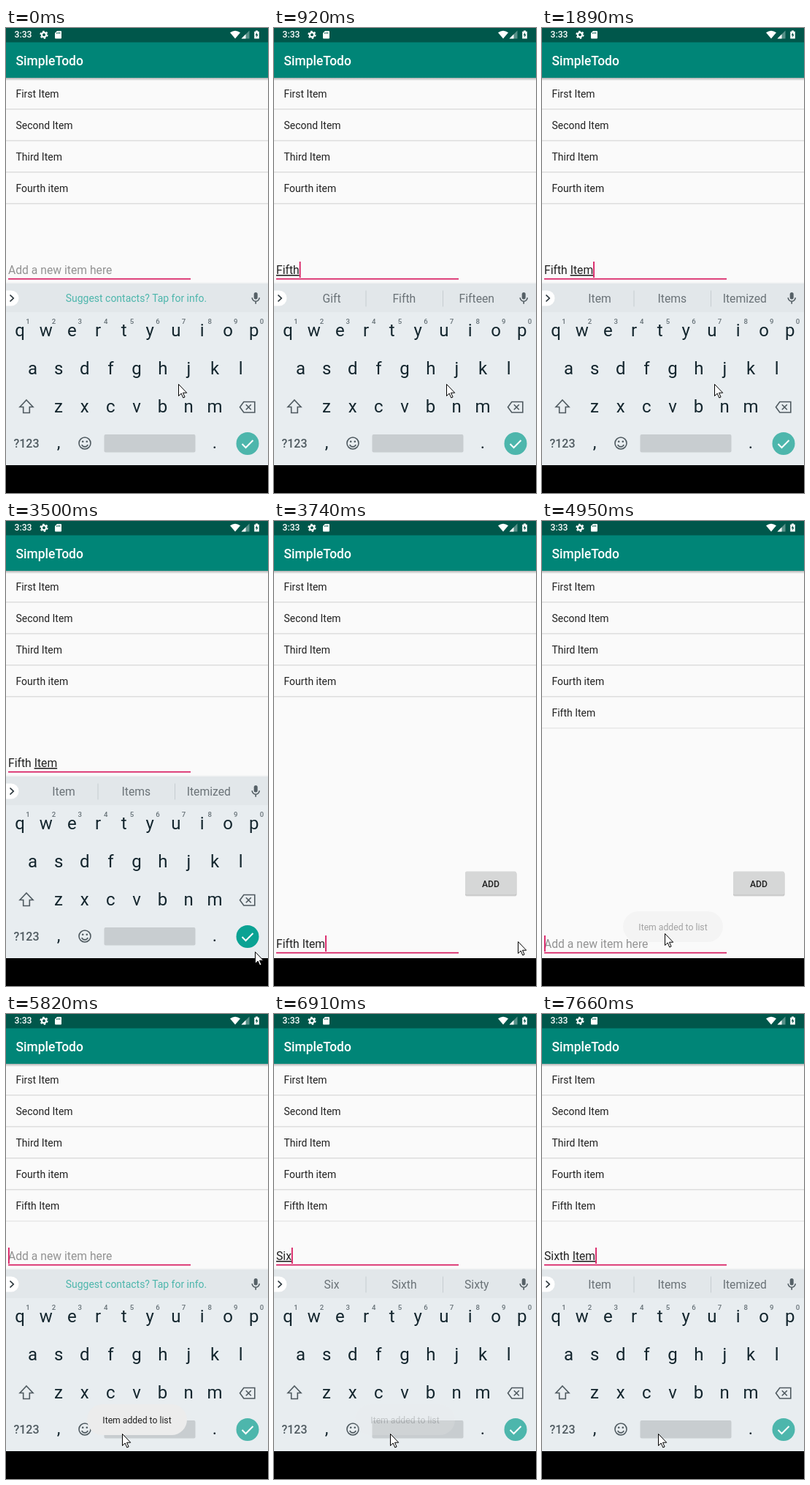
These frames come from a looping animation (359x635 px, 8000 ms). An HTML page:

```html
<!DOCTYPE html>
<html lang="en">
<head>
<meta charset="utf-8">
<title>Todo list demo</title>
<style>
  html, body { margin: 0; width: 359px; height: 635px; overflow: hidden; background: #fafafa; }
  svg { display: block; }
  text { font-family: Roboto, "Liberation Sans", sans-serif; white-space: pre; }
  .mid { text-anchor: middle; }
  .bold { font-weight: 500; }
  .row { font-size: 13.97px; fill: #212121; }
  .edit { font-size: 15.71px; }
  #word { text-decoration: underline; text-decoration-thickness: 1px; text-underline-offset: 1.5px; }
  .key { font-size: 24px; fill: #14262e; text-anchor: middle; }
  .digit { font-size: 9.6px; font-weight: 500; fill: #667177; text-anchor: middle; }
  .hintword { font-size: 15.71px; fill: #6a7277; text-anchor: middle; }
  .line { fill: none; stroke: #4f5a60; stroke-width: 1.6; }
</style>
</head>
<body>
<svg width="359" height="635" viewBox="0 0 359 635">
  <defs>
    <linearGradient id="shade" x2="0" y2="1">
      <stop stop-color="#000" stop-opacity=".3"/>
      <stop offset="1" stop-color="#000" stop-opacity="0"/>
    </linearGradient>
  </defs>
  <rect width="359" height="635" fill="#fafafa"/>
  <g id="list"></g>
  <rect y="68" width="359" height="4" fill="url(#shade)"/>
  <rect y="19" width="359" height="49" fill="#008577"/>
  <rect width="359" height="19.5" fill="#00574b"/>
  <text x="13.5" y="51" font-size="17.46" class="bold" fill="#fff">SimpleTodo</text>

  <g fill="#fff">
    <text x="11.5" y="13.4" font-size="12.2" class="bold">3:33</text>
    <circle cx="52" cy="9.3" r="3.1" fill="none" stroke="#fff" stroke-width="2.2"/>
    <circle cx="52" cy="9.3" r="4.8" fill="none" stroke="#fff" stroke-width="1.7" stroke-dasharray="2.5 2.53"/>
    <path d="M70 4h5q1 0 1 1v8.500q0 1-1 1h-7q-1 0-1-1v-6.500z"/>
    <path d="M69.700 6v2M71.700 5.500v2.500M73.700 5.500v2.500" stroke="#00574b" stroke-width=".9"/>
    <path d="M307 6.300q7-5 14 0l-7 8.200z"/>
    <path d="M333.500 3.500v11h-11z" opacity=".35"/>
    <path d="M328.500 8.500v6h-6z"/>
    <path d="M342 3.500h3v1.200h1.800v9.800h-6.600v-9.800h1.800z"/>
    <path d="M344 6l-2.300 4h1.500v3l2.300-4.200h-1.500z" fill="#00574b"/>
  </g>

  <g id="button">
    <rect x="262" y="480" width="70.500" height="32.500" rx="2" fill="#000" opacity=".13"/>
    <rect x="262" y="479.500" width="70.500" height="32" rx="2" fill="#000" opacity=".12"/>
    <rect id="face" x="262" y="478.500" width="70" height="32" rx="2"/>
    <text x="297" y="499.500" font-size="12.2" class="bold mid" fill="#212121">ADD</text>
  </g>

  <g id="field">
    <rect x="3" y="341.800" width="250" height="1.700" fill="#d81b60"/>
    <text id="hint" class="edit" x="3" y="336" fill="#929292">Add a new item here</text>
    <text id="typed" class="edit" x="3" y="336" fill="#212121"><tspan id="done"></tspan><tspan id="word"></tspan></text>
    <rect id="caret" y="319" width="1.800" height="22" fill="#d81b60"/>
  </g>

  <g id="keyboard">
    <rect y="347.500" width="359" height="2" fill="#eff1f2"/>
    <rect y="349" width="359" height="248" fill="#e8edf0"/>
    <rect y="349" width="359" height="39" fill="#e2e7ea"/>
    <path d="M0 358.500h7a10.500 10.500 0 0 1 0 21h-7z" fill="#fff"/>
    <path d="M5.500 364.500l4.700 4.500-4.700 4.500" fill="none" stroke="#263238" stroke-width="1.700"/>
    <rect x="339.700" y="361" width="5" height="9.500" rx="2.500" fill="#566167"/>
    <path d="M337.200 368.200a5 5 0 0 0 10 0M342.200 373.200v3.500" class="line"/>
    <text id="tip" x="178.500" y="374.200" font-size="13.97" class="mid" fill="#4db6ac">Suggest contacts? Tap for info.</text>
    <g id="words">
      <path d="M126 358.500v22M231.500 358.500v22" stroke="#c6ccd0"/>
      <text class="hintword" x="79" y="375"></text>
      <text class="hintword" x="178.300" y="375"></text>
      <text class="hintword" x="277.800" y="375"></text>
    </g>
    <g id="keys"></g>
    <path d="M28 508l9 9.500h-4.700v8h-8.600v-8h-4.700z" class="line"/>
    <path d="M325.800 510.500h15v14.500h-15l-5.300-7.250zM328.800 514.300l7 7M335.800 514.300l-7 7" class="line"/>
    <text x="28" y="572.800" font-size="16" class="bold mid" fill="#4f5a60">?123</text>
    <circle cx="108" cy="567" r="8" class="line"/>
    <circle cx="105.200" cy="564.700" r="1.300" fill="#4f5a60"/>
    <circle cx="110.800" cy="564.700" r="1.300" fill="#4f5a60"/>
    <path d="M103.800 569a4.500 4.500 0 0 0 8.400 0" class="line"/>
    <rect x="134.500" y="555" width="125" height="24.500" rx="2" fill="#c8cdd0"/>
    <circle id="enter" cx="331" cy="567.500" r="15.500"/>
    <path d="M323.500 568l5 5 10-10" fill="none" stroke="#fff" stroke-width="2"/>
  </g>

  <rect y="597" width="359" height="38"/>
  <g id="toast">
    <rect x="111" y="533" width="137" height="42" rx="21" fill="#ececec"/>
    <text x="179.500" y="558.500" font-size="12.2" class="mid" fill="#222">Item added to list</text>
  </g>
  <path id="mouse" d="M.5 .5v16l3.700-3.500 2.600 6 2.300-1-2.600-5.800h5.200z" fill="#fff" stroke="#000"/>
</svg>

<script>
const LOOP = 8000;
const $ = id => document.getElementById(id);

function add(parent, tag, attrs, text = "") {
  const el = document.createElementNS("http://www.w3.org/2000/svg", tag);
  for (const name in attrs) el.setAttribute(name, attrs[name]);
  el.textContent = text;
  return parent.appendChild(el);
}

const rows = ["First Item", "Second Item", "Third Item", "Fourth item", "Fifth Item"].map((label, i) => {
  const row = add($("list"), "g", { transform: `translate(0 ${68 + 43 * i})` });
  add(row, "text", { class: "row", x: 13.5, y: 27 }, label);
  add(row, "rect", { y: 42, width: 359, height: 1.6, fill: i < 4 ? "#dfdfdf" : "#e9e9e9" });
  return row;
});

[["qwertyuiop", 19, 421], ["asdfghjkl", 36.5, 472.5], ["zxcvbnm", 72, 524.5]].forEach(([letters, x, y]) => {
  [...letters].forEach((letter, i) => add($("keys"), "text", { class: "key", x: x + 35.65 * i, y }, letter));
});
[..."1234567890"].forEach((d, i) => add($("keys"), "text", { class: "digit", x: 30 + 35.6 * i, y: 404 }, d));
add($("keys"), "text", { class: "key", x: 72, y: 574 }, ",");
add($("keys"), "text", { class: "key", x: 286, y: 574 }, ".");

const START = {
  done: "", word: "", caret: 0, words: "", keyboard: 1, fifth: 0,
  enter: 0, press: 0, toast: 0, mouse: [236, 486]
};

// Each step holds the values that change at that time.
const STEPS = [
  [280, { caret: 1 }],
  [530, { word: "F" }],
  [650, { word: "Fif" }],
  [800, { word: "Fift", words: "Gift Fifth Fifteen" }],
  [920, { word: "Fifth" }],
  [1040, { words: "Fifth Fifths Firth" }],
  [1310, { done: "Fifth ", word: "", words: "and day in" }],
  [1590, { word: "I", words: "I In It" }],
  [1740, { word: "Ite", words: "Ite Item Items" }],
  [1890, { word: "Item", words: "Item Items Itemized" }],
  [2290, { caret: 0 }],
  [2720, { mouse: [277, 509] }],
  [2840, { mouse: [321, 537], caret: 1 }],
  [2990, { mouse: [341, 580] }],
  [3110, { mouse: [348, 604] }],
  [3230, { mouse: [343, 593] }],
  [3380, { mouse: [341, 588], caret: 0, enter: 1 }],
  [3620, { keyboard: 0, enter: 0, done: "Fifth Item", word: "" }],
  [3740, { mouse: [334, 574], caret: 1 }],
  [4020, { mouse: [327, 537] }],
  [4170, { mouse: [314, 513], caret: 0 }],
  [4290, { mouse: [305, 501] }],
  [4440, { mouse: [303, 500] }],
  [4590, { press: 1 }],
  [4710, { done: "", words: "", fifth: 1, caret: 1 }],
  [4830, { press: 0, mouse: [232, 532] }],
  [4950, { mouse: [168, 563], toast: .4 }],
  [5100, { toast: .85, caret: 0 }],
  [5250, { mouse: [162, 570], toast: 1 }],
  [5370, { mouse: [159, 573] }],
  [5670, { caret: 1 }],
  [5820, { keyboard: 1 }],
  [6090, { caret: 0 }],
  [6520, { caret: 1 }],
  [6640, { word: "S" }],
  [6760, { word: "Si", toast: .8 }],
  [6910, { word: "Six", words: "Six Sixth Sixty", toast: .2 }],
  [7030, { word: "Sixt", toast: 0 }],
  [7150, { word: "Sixth", words: "Sixth Sixths Sixty" }],
  [7270, { done: "Sixth ", word: "", words: "and day in" }],
  [7420, { word: "I", words: "I In It" }],
  [7540, { word: "Ite", words: "Ite Item Items" }],
  [7660, { word: "Item", words: "Item Items Itemized" }]
];

const show = (el, on) => el.setAttribute("visibility", on ? "inherit" : "hidden");
const move = (el, x, y) => el.setAttribute("transform", `translate(${x} ${y})`);
const suggestions = $("words").querySelectorAll("text");

function draw(s) {
  $("done").textContent = s.done;
  $("word").textContent = s.word;
  const filled = s.done + s.word !== "";
  show($("hint"), !filled);
  show($("caret"), s.caret);
  $("caret").setAttribute("x", 3 + (filled ? $("typed").getComputedTextLength() : 0));
  move($("field"), 0, s.keyboard ? 0 : 247);

  show($("keyboard"), s.keyboard);
  show($("button"), !s.keyboard);
  show($("tip"), !s.words);
  show($("words"), s.words);
  const words = s.words.split(" ");
  suggestions.forEach((el, i) => el.textContent = words[i] || "");
  $("enter").setAttribute("fill", s.enter ? "#0aa293" : "#4db6ac");
  $("face").setAttribute("fill", s.press ? "#bfc0bf" : "#d6d7d7");

  show(rows[4], s.fifth);
  $("toast").setAttribute("opacity", s.toast);
  move($("mouse"), ...s.mouse);
}

let last = -1;
function tick() {
  const t = performance.now() % LOOP;
  const past = STEPS.filter(([at]) => at <= t);
  if (past.length !== last) {
    last = past.length;
    draw(Object.assign({}, START, ...past.map(step => step[1])));
  }
  requestAnimationFrame(tick);
}
tick();
</script>
</body>
</html>
```
